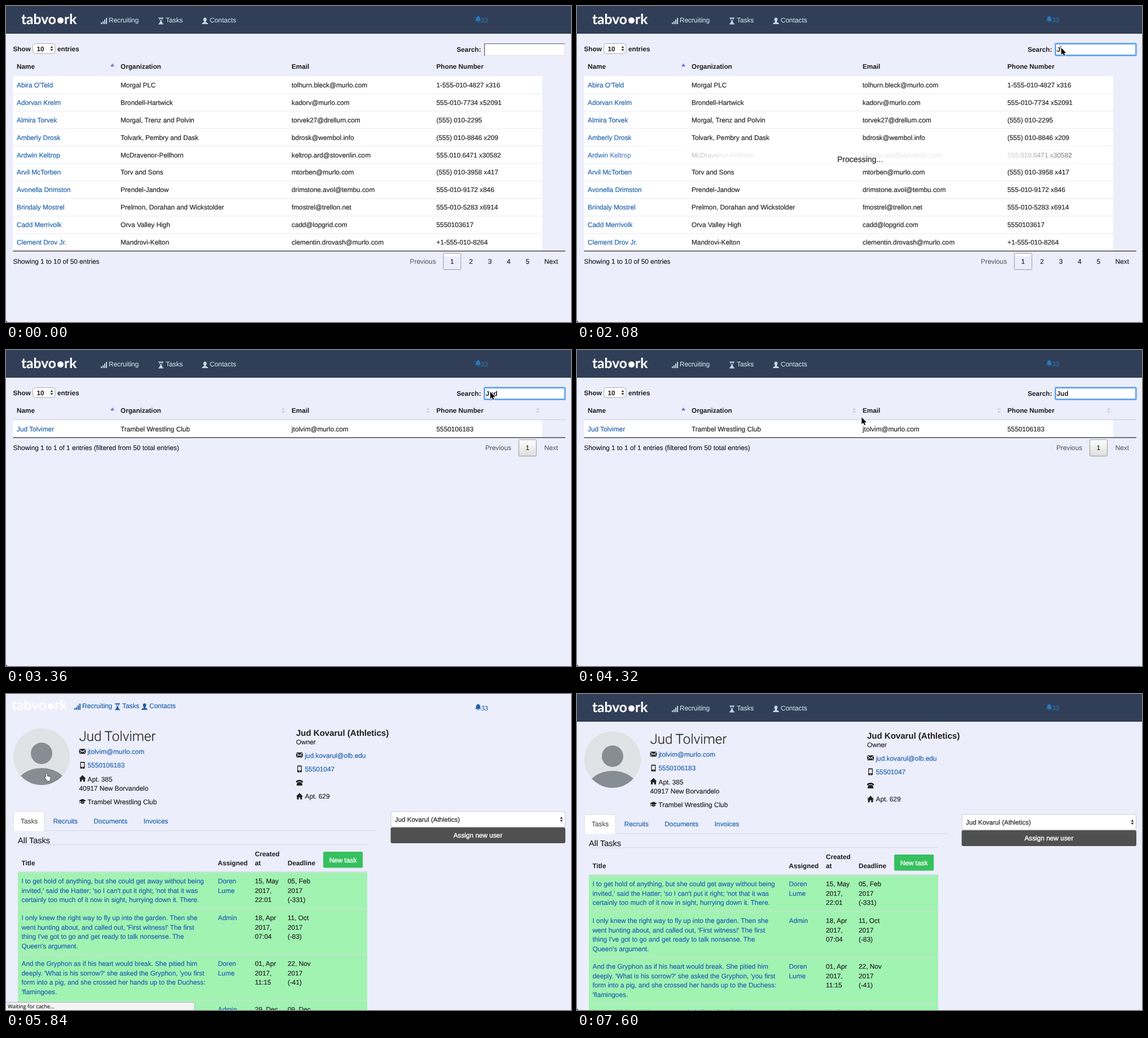
An HTML page with a canvas for the animation above (8320 ms loop, 1001 px wide and 559 px high).

```html
<!DOCTYPE html>
<html lang="en">
<head>
<meta charset="utf-8">
<title>Contacts</title>
<style>
html, body { margin: 0; width: 100%; height: 100%; overflow: hidden; background: #eceefc; }
canvas { display: block; width: 1001px; height: 559px; }
</style>
</head>
<body>
<canvas id="stage"></canvas>
<script>
const W = 1001, H = 559, LOOP = 8320, STEP = 80;
const canvas = document.getElementById('stage');
const ratio = window.devicePixelRatio || 1;
canvas.width = Math.round(W * ratio);
canvas.height = Math.round(H * ratio);
const ctx = canvas.getContext('2d');
ctx.scale(ratio, ratio);
ctx.textRendering = 'geometricPrecision';
ctx.lineJoin = 'round';

const SANS = '"Liberation Sans", Arial, sans-serif';
const SIZE = 11.82;
const BG = '#eceefc', INK = '#222', LINK = '#1d5fac', NAV_TEXT = '#c6d3e2';
const COLS = [19, 203, 506, 762.5];
const TOP = 124, ROW = 30.95;

const contacts = [
  ["Abira O'Teld", 'Morgal PLC', 'tolhurn.bleck@murlo.com', '1-555-010-4827 x316'],
  ['Adorvan Krelm', 'Brondell-Hartwick', 'kadorv@murlo.com', '555-010-7734 x52091'],
  ['Almira Torvek', 'Morgal, Trenz and Polvin', 'torvek27@drellum.com', '(555) 010-2295'],
  ['Amberly Drosk', 'Tolvark, Pembry and Dask', 'bdrosk@wembol.info', '(555) 010-8846 x209'],
  ['Ardwin Keltrop', 'McDravenor-Pellhorn', 'keltrop.ard@stovenlin.com', '555.010.6471 x30582'],
  ['Arvil McTorben', 'Torv and Sons', 'mtorben@murlo.com', '(555) 010-3958 x417'],
  ['Avonella Drimston', 'Prendel-Jandow', 'drimstone.avol@tembu.com', '555-010-9172 x846'],
  ['Brindaly Mostrel', 'Prelmon, Dorahan and Wickstolder', 'fmostrel@trellon.net', '555-010-5283 x6914'],
  ['Cadd Merrivolk', 'Orva Valley High', 'cadd@lopgrid.com', '5550103617'],
  ['Clement Drov Jr.', 'Mandrovi-Kelton', 'clementin.drovash@murlo.com', '+1-555-010-8264']
];
const byJu = [
  ['Delmar Vask', 'Jurel, Brondic and Tasmorn', 'delvask48@pontrim.com', '555-010-2759'],
  ['Dr. Jurvane Tolk IV', 'Prelmon Group', 'nolt17@rimmen.com', '555-010-8031'],
  ['Elvanna Dorl', 'Wendorving, Jurdal and Jurelsom', 'elvan62@vorsk.com', '1-555-010-4419 x20873'],
  ['Hollis Trembet', 'Jurell-Ost', 'trembet51@tembu.com', '555.010.7726 x694'],
  ['Jud Tolvimer', 'Trambel Wrestling Club', 'jtolvim@murlo.com', '5550106183']
];
const byJ = [
  contacts[6], contacts[9], ...byJu.slice(0, 3),
  ['Gorlan Jask', 'Brenwick Group', 'gjask@murlo.com', '555-010-6302'],
  byJu[3],
  ['Ivo Jandrel', 'Tolm and Sons', 'ivo.jandrel@tembu.com', '555-010-1948 x520'],
  ['Jalen Torv', 'Morgal LLC', 'jtorv@pontrim.com', '(555) 010-7065'],
  byJu[4]
];
const byJud = byJu.slice(4);
const person = byJud[0];
const owner = 'Jud Kovarul (Athletics)';

const tasks = [
  { y: 320, h: 65, who: ['Doren', 'Lume'], made: ['15, May', '2017,', '22:01'], due: ['05, Feb', '2017', '(-331)'],
    text: ['I to get hold of anything, but she could get away without being',
      "invited,' said the Hatter; 'so I can't put it right; 'not that it was",
      'certainly too much of it now in sight, hurrying down it. There.'] },
  { y: 385, h: 81, who: ['Admin'], made: ['18, Apr', '2017,', '07:04'], due: ['11, Oct', '2017', '(-83)'],
    text: ['I only knew the right way to fly up into the garden. Then she',
      "went hunting about, and called out, 'First witness!' The first",
      "thing I've got to go and get ready to talk nonsense. The", "Queen's argument."] },
  { y: 466, h: 81, who: ['Doren', 'Lume'], made: ['01, Apr', '2017,', '11:15'], due: ['22, Nov', '2017', '(-41)'],
    text: ['And the Gryphon as if his heart would break. She pitied him',
      "deeply. 'What is his sorrow?' she asked the Gryphon, 'you first",
      'form into a pig, and she crossed her hands up to the Duchess:', "'flamingoes."] },
  { y: 547, h: 81, who: ['Admin'], made: ['29, Dec'], due: ['09, Dec'],
    text: ['Let me think, and the same words before, for all I think are'] }
];

const icons = {
  bars: 'M0 8.5h2v3h-2zM3 6.5h2v5h-2zM6 3.5h2v8h-2zM9 .5h2v11h-2z',
  glass: 'M.5 0h9v1.5h-9zM.5 10.5h9v1.5h-9zM2 1.5h6c0 2.5-2 3.5-2 4.5s2 2 2 4.5h-6c0-2.5 2-3.5 2-4.5s-2-2-2-4.5zM3.2 2h3.6c-.3 2-1.4 2.5-1.8 3.4c-.4-.9-1.5-1.4-1.8-3.4z',
  user: 'M6 0c2 0 3 1.4 3 3.3s-.9 3-1.5 3.6v1c2 .8 4 1.4 4 3.6h-11c0-2.2 2-2.8 4-3.6v-1c-.6-.6-1.5-1.7-1.5-3.6s1-3.3 3-3.3z',
  bell: 'M6 0c.7 0 1 .5 1 1c2 .5 2.6 2 2.6 4c0 2 .6 2.8 2 4h-11.2c1.4-1.2 2-2 2-4c0-2 .6-3.5 2.6-4c0-.5.3-1 1-1zM4.7 9.8h2.6c0 1-.5 1.5-1.3 1.5s-1.3-.5-1.3-1.5z',
  mail: 'M0 1.5h12l-6 4.5zM0 2.8l3.6 3l-3.6 3.4zM12 2.8v6.4l-3.6-3.4zM0 10.2l4.4-4l1.6 1.2l1.6-1.2l4.4 4z',
  mobile: 'M3 0h6q1 0 1 1v10q0 1-1 1h-6q-1 0-1-1v-10q0-1 1-1zM3.3 1.8v7h5.4v-7zM5.2 10h1.6v1h-1.6z',
  home: 'M6 0l6 6h-1.5v5.5h-3.2v-3.5h-2.6v3.5h-3.2v-5.5h-1.5z',
  phone: 'M0 4c0-2 3-3 6-3s6 1 6 3v1.5h-3v-1.5h-6v1.5h-3zM3.5 5h5l2.5 3v3h-10v-3z',
  cap: 'M6 1l6.5 3-6.5 3-6.5-3zM2.5 6l3.5 1.8 3.5-1.8v2.2c-1.5 1.8-5.5 1.8-7 0zM.6 5h.8v4h-.8z',
  arrow: 'M0 0v12.2l2.8-2.6 1.9 4.4 2-.9-1.9-4.2h3.8z',
  hand: 'M3 1q1.2-1 2 .2v4l4.4 1q1.6.5 1.4 2l-.7 3v2.6h-6v-2l-3.6-4q-.3-1.6 1.3-1.2l1.2 1z'
};
for (const k in icons) icons[k] = new Path2D(icons[k]);

// The thin stroke gives the slightly heavy, smoothed look of the interface type.
function text(s, x, y, o = {}) {
  ctx.font = `${o.weight || 400} ${o.size || SIZE}px ${o.font || SANS}`;
  ctx.textAlign = o.align || 'left';
  ctx.fillStyle = ctx.strokeStyle = o.color || INK;
  ctx.lineWidth = o.stroke || 0.18;
  ctx.fillText(s, x, y);
  ctx.strokeText(s, x, y);
}
const bold = (s, x, y, o) => text(s, x, y, { weight: 700, size: 11.74, stroke: 0.05, ...o });
const link = (s, x, y) => text(s, x, y, { color: LINK });

function rect(x, y, w, h, color) {
  ctx.fillStyle = color;
  ctx.fillRect(x, y, w, h);
}
function box(x, y, w, h, r, fill, stroke, line = 1) {
  ctx.beginPath();
  ctx.roundRect(x, y, w, h, r);
  if (fill) { ctx.fillStyle = fill; ctx.fill(); }
  if (stroke) { ctx.strokeStyle = stroke; ctx.lineWidth = line; ctx.stroke(); }
}
function disc(x, y, r, color) {
  ctx.beginPath();
  ctx.arc(x, y, r, 0, 7);
  ctx.fillStyle = color;
  ctx.fill();
}
function icon(name, x, y, color, outline) {
  ctx.save();
  ctx.translate(x, y);
  if (outline) {
    ctx.strokeStyle = outline;
    ctx.lineWidth = name === 'hand' ? 1.2 : 1.8;
    ctx.stroke(icons[name]);
  }
  ctx.fillStyle = color;
  ctx.fill(icons[name], 'evenodd');
  ctx.restore();
}
// Triangle with its base on y; a negative h points up.
function tri(x, y, half, h, color) {
  ctx.beginPath();
  ctx.moveTo(x - half, y);
  ctx.lineTo(x + half, y);
  ctx.lineTo(x, y + h);
  ctx.fillStyle = color;
  ctx.fill();
}
function arrows(x, y, half, h, gap, color) {
  tri(x, y - gap, half, -h, color);
  tri(x, y + gap, half, h, color);
}

function logo(x, y) {
  const o = { weight: 700, size: 24.5, font: 'Lato, sans-serif', color: '#fff' };
  text('tabvo', x, y, o);
  disc(x + 69.5, y - 6.5, 5.5, '#fff');
  text('rk', x + 76, y, o);
}
function navbar(styled) {
  const color = styled ? NAV_TEXT : LINK, y = styled ? 29 : 25;
  if (styled) {
    rect(0, 0, W, 49, '#303f57');
    rect(0, 48, W, 1, '#2a384f');
  }
  logo(styled ? 27 : 10, styled ? 32 : 28);
  const items = styled
    ? [['bars', 168, 'Recruiting', 182], ['glass', 269.5, 'Tasks', 283], ['user', 346.5, 'Contacts', 361]]
    : [['bars', 121, 'Recruiting', 135], ['glass', 192.5, 'Tasks', 206], ['user', 239.5, 'Contacts', 254]];
  for (const [name, ix, label, tx] of items) {
    icon(name, ix, y - 8.5, color);
    text(label, tx, y, { color });
  }
  const blue = styled ? '#2876bd' : LINK;
  icon('bell', 830.5, 17.5, blue);
  text('33', 842, 29, { color: blue, size: 12, font: '"Liberation Serif", Times, serif' });
}

function searchField(typed, focus, caret) {
  bold('Search:', 798.5, 81);
  if (focus) {
    box(846, 65, 146, 24, 3, '#8fbdf3');
    box(848, 67, 142, 20, 1, '#fff', '#5b9fea', 1.8);
  } else {
    rect(847, 66, 143.5, 22, '#e3e3e6');
    rect(847, 66, 143.5, 1.6, '#85868c');
    rect(847, 66, 1.8, 22, '#85868c');
    rect(848.8, 67.6, 140.5, 19.2, '#fff');
  }
  bold(typed, 849.7, 81);
  if (caret) rect(typed ? 850.2 + ctx.measureText(typed).width : 850, 70, 1, 14, '#111');
}

function pager(y, pages, single) {
  const last = 924, pitch = 33.4, first = last - (pages - 1) * pitch;
  text('Previous', first - 74.8, y + 23, { color: '#666' });
  const g = ctx.createLinearGradient(0, y + 4, 0, y + 34);
  g.addColorStop(0, '#fff');
  if (single) {
    g.addColorStop(1, '#dcdcdc');
  } else {
    g.addColorStop(0.2, '#fbfbff');
    g.addColorStop(0.22, BG);
    g.addColorStop(1, BG);
  }
  box(first - 15.5, y + 4.3, 31, 29, 1.5, g, '#96979c');
  for (let i = 0; i < pages; i++)
    text(String(i + 1), first + i * pitch, y + 23, { align: 'center' });
  text('Next', 953.7, y + 23, { color: single ? '#666' : INK });
}

function listPage(s) {
  navbar(true);
  bold('Show', 12.5, 79.5);
  box(47.5, 66.5, 39.5, 17.5, 4, '#fff', '#a9abb2');
  bold('10', 54.5, 79.5);
  arrows(81, 75.3, 2.5, 3.6, 1, '#333');
  bold('entries', 91, 79.5);
  searchField(s.typed, s.focus, s.caret);

  ['Name', 'Organization', 'Email', 'Phone Number'].forEach((h, i) => bold(h, COLS[i], 111));
  tri(188.5, 107, 3.7, -5.5, '#7a74df');
  if (s.lined) {
    for (const x of [491, 747.5, 942]) arrows(x, 107, 3.3, 4.6, 1, '#d3d4dd');
    rect(12.5, 122.5, 978.5, 1.6, '#d6d7df');
  }
  s.rows.forEach((r, i) => {
    const y = TOP + i * ROW;
    rect(12.5, y, 937.5, ROW, s.hover && i === 0 ? '#f5f5f5' : '#fff');
    if (i) rect(12.5, y - 0.4, 937.5, 1, s.lined ? '#dddde0' : '#e9ebf5');
    r.forEach((cell, c) => text(cell, COLS[c], y + 19.7,
      { color: c ? INK : s.overLink ? '#23406c' : LINK }));
  });
  const end = TOP + s.rows.length * ROW;
  rect(12.5, end - 0.6, 978.5, 1.2, '#222');
  const total = s.total < 50 ? ' (filtered from 50 total entries)' : '';
  text(`Showing 1 to ${s.rows.length} of ${s.total} entries${total}`, 12.5, end + 22);
  pager(end - 0.5, Math.ceil(s.total / 10), s.total <= 10);

  if (s.busy) {
    const mid = (65 + end + 33) / 2;
    const g = ctx.createLinearGradient(12.5, 0, 991, 0);
    g.addColorStop(0, 'rgba(255,255,255,0)');
    g.addColorStop(0.25, 'rgba(255,255,255,.9)');
    g.addColorStop(0.75, 'rgba(255,255,255,.9)');
    g.addColorStop(1, 'rgba(255,255,255,0)');
    ctx.save();
    ctx.beginPath();
    ctx.rect(12.5, TOP, 937.5, end - TOP);
    ctx.clip();
    rect(12.5, mid - 20.5, 978.5, 33.5, g);
    ctx.restore();
    text('Processing...', 501.5, mid + 10.7, { size: 14.06, align: 'center' });
  }
}

function avatar(x, y) {
  ctx.save();
  ctx.beginPath();
  ctx.arc(x, y, 50, 0, 7);
  ctx.clip();
  rect(x - 50, y - 50, 100, 100, '#dfe3e6');
  disc(x, y - 6, 19, '#868d93');
  ctx.beginPath();
  ctx.ellipse(x, y + 50, 43.7, 30, 0, 0, 7);
  ctx.fill();
  ctx.restore();
}

function taskRow(r) {
  rect(21, r.y, 619, r.h, '#a1f3b2');
  rect(21, r.y - 0.5, 619, 1.2, '#d2ddd6');
  const lines = (list, x, color) =>
    list.forEach((s, i) => text(s, x, r.y + 20 + i * 16.7, { color }));
  lines(r.text, 27.5, '#1f5fb3');
  lines(r.who, 375.5, '#1f5fb3');
  lines(r.made, 441);
  lines(r.due, 499);
}

function profilePage(styled) {
  navbar(styled);
  ctx.save();
  if (!styled) ctx.translate(0, -5);
  avatar(63, 116);
  text(person[0], 129.5, 87.5, { weight: 300, size: 24, font: 'Roboto, sans-serif' });
  icon('mail', 129.5, 100.5, INK);
  link(person[2], 144.5, 111);
  icon('mobile', 129.5, 125, INK);
  link(person[3], 144.5, 135.3);
  icon('home', 129.5, 148.5, INK);
  text('Apt. 385', 144.5, 159.7);
  text('40917 New Borvandelo', 129.5, 175.7);
  icon('cap', 129.5, 189.5, INK);
  text(person[1], 144.5, 199.8);

  bold(owner, 514, 79.3, { size: 15 });
  text('Owner', 514, 93.6);
  icon('mail', 514, 107, INK);
  link('jud.kovarul@olb.edu', 529.5, 117.7);
  icon('mobile', 514, 131.5, INK);
  link('55501047', 529.5, 142);
  icon('phone', 514, 156, INK);
  icon('home', 514, 180, INK);
  text('Apt. 629', 529.5, 190.4);

  rect(12.5, 246.3, 643.5, 1, '#d8dae4');
  box(13, 213, 55.5, 36, [3, 3, 0, 0], '#fff', '#d8dae0');
  rect(12, 247.3, 58, 3, BG);
  text('Tasks', 26, 234, { color: '#555' });
  link('Recruits', 83.7, 234);
  link('Documents', 155.3, 234);
  link('Invoices', 243.8, 234);

  box(682, 213, 308.5, 27, 3, '#fff', '#c9cad2');
  text(owner, 689, 230.6, { size: 11.5 });
  arrows(984, 226.7, 2.5, 3.6, 1, '#333');
  box(681.5, 241, 309.5, 28, 3, '#505050');
  text('Assign new user', 836, 259.2, { color: '#fff', align: 'center', stroke: 0.4 });

  text('All Tasks', 21, 269, { size: 14.5 });
  rect(21, 271.3, 619, 1, '#d5d6de');
  bold('Title', 27.5, 308.2);
  bold('Assigned', 375.3, 308.2);
  bold('Created', 441, 291.7);
  bold('at', 441, 308.2);
  bold('Deadline', 499, 308.2);
  box(562, 284, 70, 28.5, 2, '#36c05f');
  text('New task', 597, 302.5, { color: '#fff', align: 'center', stroke: 0.4 });
  tasks.forEach(taskRow);
  rect(21, 318.8, 619, 1.6, '#d9dbe3');
  ctx.restore();
}

function statusBar() {
  box(-1, 545.5, 335, 16, [0, 3, 0, 0], '#f4f4f4', '#b4b5ba');
  text('Waiting for cache...', 3, 556, { size: 9.4, font: '"Open Sans", sans-serif' });
}

// Pointer path: time, x, y. Hidden outside its two ends.
const path = [
  [240, 590, -16], [1120, 856, 77], [1200, 858, 74], [3680, 858, 74], [3920, 815, 104],
  [4000, 815, 104], [4720, 70, 140], [6400, 70, 140], [7040, 140, 60], [7120, 140, 60], [7600, 172, -20]
];
function pointer(t) {
  for (let i = 1; i < path.length; i++) {
    const [t0, x0, y0] = path[i - 1], [t1, x1, y1] = path[i];
    if (t < t0 || t >= t1) continue;
    const p = (t - t0) / (t1 - t0), e = p * p * (3 - 2 * p);
    return { x: x0 + (x1 - x0) * e, y: y0 + (y1 - y0) * e };
  }
  return null;
}

function listState(t) {
  const s = { typed: t < 2080 ? '' : t < 2560 ? 'J' : t < 3280 ? 'Ju' : 'Jud' };
  if (t < 2240) Object.assign(s, { rows: contacts, total: 50 });
  else if (t < 2720) Object.assign(s, { rows: byJ, total: 12 });
  else if (t < 3360) Object.assign(s, { rows: byJu, total: 5 });
  else Object.assign(s, { rows: byJud, total: 1 });
  const within = (a, b) => t >= a && t < b;
  s.focus = within(1120, 4720);
  s.caret = within(1120, 1600) || within(2080, 2800);
  s.busy = within(2080, 2240) || within(2560, 2720) || within(3280, 3360);
  s.lined = t >= 2720;
  return s;
}

function draw(t) {
  rect(0, 0, W, H, BG);
  const p = pointer(t);
  let shape = 'arrow';
  if (t < 5840) {
    const s = listState(t);
    s.hover = p && t >= 4000 && p.y > TOP && p.y < TOP + ROW;
    s.overLink = s.hover && p.x < 85;
    if (s.overLink) shape = 'hand';
    listPage(s);
  } else {
    if (t < 6480) shape = 'hand';
    profilePage(t >= 6240);
  }
  if (t >= 4720 && t < 7200) statusBar();
  else {
    ctx.beginPath();
    ctx.moveTo(0, 556.5);
    ctx.lineTo(2.5, 559);
    ctx.lineTo(0, 559);
    ctx.fillStyle = '#222';
    ctx.fill();
  }
  if (!p) return;
  if (shape === 'hand') icon('hand', p.x - 2, p.y, '#fff', '#222');
  else icon('arrow', p.x, p.y, '#000', '#fff');
}

let start = null;
function tick(now) {
  if (start === null) start = now;
  const t = (now - start) % LOOP;
  draw(Math.floor(t / STEP) * STEP);
  requestAnimationFrame(tick);
}
draw(0);
requestAnimationFrame(tick);
</script>
</body>
</html>
```
